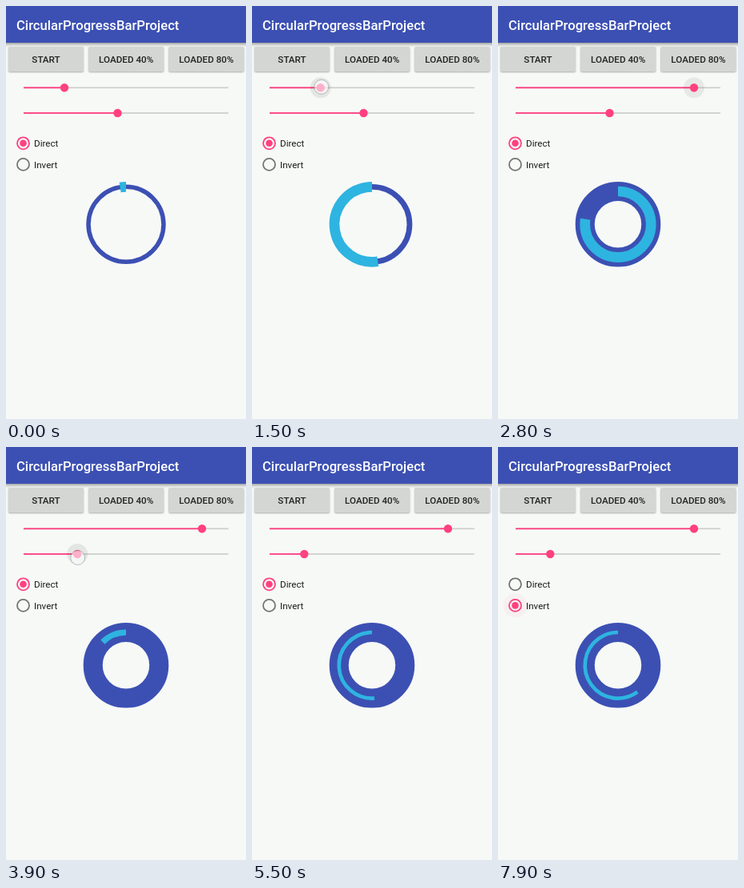
Animation of 300 by 517 pixels, one loop 8000 ms. Source, as an HTML page with a canvas:

```html
<!DOCTYPE html>
<html lang="en">
<head>
<meta charset="utf-8">
<title>Circular progress bar</title>
<style>
  html, body { margin: 0; width: 100%; height: 100%; overflow: hidden; background: #f7f9f7; }
  canvas { display: block; width: 300px; height: 517px; }
</style>
</head>
<body>
<canvas id="stage"></canvas>
<script>
const W = 300, H = 517, LOOP = 8000, STEP = 100;
const BLUE = '#3c50b3', CYAN = '#2eb4e0', PINK = '#ff4081', BG = '#f7f9f7';
const FONT = 'Roboto, sans-serif';
const TRACK = { left: 22, right: 278 };
const MAX_STROKE = 27.6;
const STOP_TIME = 7400, INVERT_TIME = 7600;

const canvas = document.getElementById('stage');
const ctx = canvas.getContext('2d');
const ratio = window.devicePixelRatio || 1;
canvas.width = W * ratio;
canvas.height = H * ratio;
ctx.scale(ratio, ratio);

const sliders = [
  { y: 102.3, from: 73, to: 245, start: 1300, end: 2500, down: 1100, up: 2750, touch: [1, -1] },
  { y: 134, from: 139.5, to: 65.3, start: 3490, end: 4150, down: 3300, up: 4250, touch: [0.5, 4.5] }
];

const progress = (t, a, b) => Math.min(1, Math.max(0, (t - a) / (b - a)));
const smooth = p => p * p * (3 - 2 * p);

function disc(x, y, r, color) {
  ctx.fillStyle = color;
  ctx.beginPath();
  ctx.arc(x, y, r, 0, Math.PI * 2);
  ctx.fill();
}

function arc(x, y, r, width, color, from = 0, to = 360) {
  const rad = deg => (deg - 90) * Math.PI / 180;
  ctx.strokeStyle = color;
  ctx.lineWidth = width;
  ctx.beginPath();
  ctx.arc(x, y, r, rad(from), rad(to));
  ctx.stroke();
}

function text(str, x, y, size, weight, color, align = 'left') {
  ctx.font = `${weight} ${size}px ${FONT}`;
  ctx.fillStyle = color;
  ctx.textAlign = align;
  ctx.fillText(str, x, y);
}

function shadowed(color, blur, offset, draw) {
  ctx.save();
  ctx.shadowColor = color;
  ctx.shadowBlur = blur * ratio;
  ctx.shadowOffsetY = offset * ratio;
  draw();
  ctx.restore();
}

function drawHeader() {
  shadowed('rgba(0,0,0,.4)', 4, 1.5, () => {
    ctx.fillStyle = BLUE;
    ctx.fillRect(-10, -10, W + 20, 56);
  });
  text('CircularProgressBarProject', 13, 29.5, 16.67, 500, '#fff');
}

function drawButton(label, x) {
  shadowed('rgba(0,0,0,.3)', 2, 1, () => {
    ctx.fillStyle = '#d4d6d4';
    ctx.beginPath();
    ctx.roundRect(x, 51, 94, 31, 1.7);
    ctx.fill();
  });
  text(label, x + 47, 71, 11.67, 500, '#222', 'center');
}

const sliderX = (s, t) => s.from + (s.to - s.from) * smooth(progress(t, s.start, s.end));
const strokeOf = x => MAX_STROKE * (x - TRACK.left) / (TRACK.right - TRACK.left);

function drawSlider(s, t) {
  const x = sliderX(s, t);
  ctx.fillStyle = '#cfd1cf';
  ctx.fillRect(TRACK.left, s.y - 0.9, TRACK.right - TRACK.left, 1.8);
  ctx.fillStyle = PINK;
  ctx.fillRect(TRACK.left, s.y - 0.9, x - TRACK.left, 1.8);

  const ripple = progress(t, s.down - 100, s.down + 100);
  const fade = 1 - progress(t, s.up, s.up + 300);
  if (ripple > 0 && fade > 0) disc(x, s.y, 13 * ripple, `rgba(0,0,0,${0.075 * fade})`);
  disc(x, s.y, 5.2, PINK);

  if (t >= s.down && t < s.up) {
    const tx = x + s.touch[0], ty = s.y + s.touch[1];
    disc(tx, ty, 8.8, 'rgba(255,255,255,.58)');
    arc(tx, ty, 9, 1, 'rgba(130,130,140,.5)');
  }
}

function drawRadio(label, y, on) {
  arc(21.5, y, 7.5, 1.8, on > 0.5 ? PINK : '#747674');
  if (on > 0) disc(21.5, y, 4.3 * on, PINK);
  text(label, 35, y + 4.2, 11.67, 400, '#1c1c1c');
}

function drawRadios(t) {
  const swap = progress(t, INVERT_TIME - 100, INVERT_TIME + 100);
  const fade = 1 - progress(t, INVERT_TIME + 50, INVERT_TIME + 350);
  if (t >= INVERT_TIME) disc(21.5, 198.4, 15, `rgba(255,64,129,${0.03 + 0.1 * fade})`);
  drawRadio('Direct', 171.8, 1 - swap);
  drawRadio('Invert', 198.4, swap);
}

function drawRing(t) {
  const cx = 150, cy = 273.3, outer = 53.3;
  const [back, front] = sliders.map(s => strokeOf(sliderX(s, t)));
  const r = outer - Math.max(back, front) / 2;
  arc(cx, cy, r, back, BLUE);

  // One turn fills the arc, the next turn empties it from its start.
  const run = Math.min(t, STOP_TIME);
  const turn = (711 + 0.36 * run + 9 * progress(run, 4700, 6200)) % 720;
  if (turn < 360) arc(cx, cy, r, front, CYAN, 0, turn);
  else arc(cx, cy, r, front, CYAN, turn - 360, 360);
}

function draw(t) {
  ctx.fillStyle = BG;
  ctx.fillRect(0, 0, W, H);
  drawHeader();
  ['START', 'LOADED 40%', 'LOADED 80%'].forEach((label, i) => drawButton(label, 3 + i * 100.2));
  sliders.forEach(s => drawSlider(s, t));
  drawRadios(t);
  drawRing(t);
}

let origin;
function frame(now) {
  origin ??= now;
  draw(Math.floor(((now - origin) % LOOP) / STEP) * STEP);
  requestAnimationFrame(frame);
}
draw(0);
requestAnimationFrame(frame);
</script>
</body>
</html>
```
